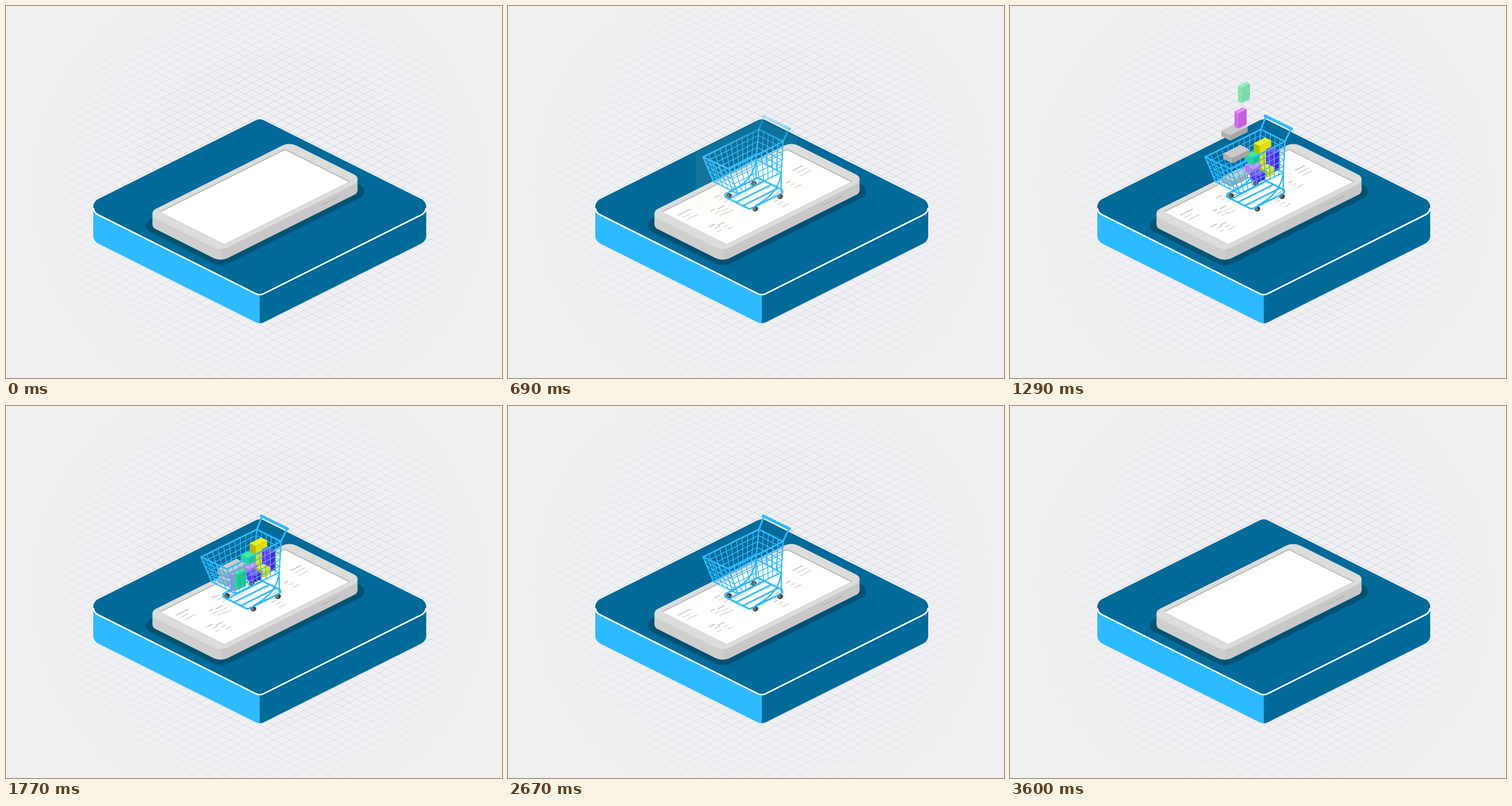
Animation of 864 by 648 pixels, one loop 3.63 s. Source, as an HTML page with a canvas:

```html
<!DOCTYPE html>
<html lang="en">
<head>
<meta charset="utf-8">
<title>Isometric shopping cart</title>
<style>
html, body { margin: 0; width: 100%; height: 100%; overflow: hidden; background: #f0f0f1; }
canvas { display: block; }
</style>
</head>
<body>
<canvas id="stage" width="864" height="648"></canvas>
<script>
const ctx = document.getElementById('stage').getContext('2d');
const LOOP = 3630, BLUE = '#2dbaff', NAVY = '#006a99';
const clamp = v => Math.max(0, Math.min(1, v));
const ramp = (t, from, to) => clamp((t - from) / (to - from));
const mix = (a, b, k) => [a[0] + (b[0] - a[0]) * k, a[1] + (b[1] - a[1]) * k];
const random = n => Math.abs(Math.sin(n * 12.9898) * 43758.5453) % 1;

function fill(color, points) {
  ctx.fillStyle = color;
  ctx.beginPath();
  points.forEach(p => ctx.lineTo(...p));
  ctx.fill();
}

function line(...points) {
  ctx.beginPath();
  points.forEach(p => ctx.lineTo(...p));
  ctx.stroke();
}

// Isometric rectangle (top, right, bottom, left) from its top corner and the
// horizontal extent of its right and left sides.
function iso(x, y, right, left) {
  return [[x, y], [x + right, y + right / 2],
    [x + right - left, y + (right + left) / 2], [x - left, y + left / 2]];
}

const moved = (points, dy) => points.map(([x, y]) => [x, y + dy]);

// radii: [top and bottom corners, side corners]
function rounded(points, radii) {
  const path = new Path2D();
  path.moveTo(...mix(points[3], points[0], 0.5));
  points.forEach((p, i) => path.arcTo(...p, ...mix(p, points[(i + 1) % 4], 0.5), radii[i % 2]));
  path.closePath();
  return path;
}

function split(x, left, right) {
  const g = ctx.createLinearGradient(x - 1, 0, x + 1, 0);
  g.addColorStop(0.5, left);
  g.addColorStop(0.5, right);
  return g;
}

function drawGrid() {
  const g = ctx.createRadialGradient(500, 310, 0, 438, 324, 440);
  g.addColorStop(0, 'rgba(120,105,235,.36)');
  g.addColorStop(0.5, 'rgba(130,140,240,.28)');
  g.addColorStop(1, 'rgba(140,180,250,0)');
  ctx.strokeStyle = g;
  ctx.lineWidth = 0.8;
  for (let y = -432; y < 1080; y += 13) {
    line([0, y], [864, y + 432]);
    line([0, y], [864, y - 432]);
  }
}

// Lower outline plus the band between the outer corners, covered by the top.
function slab(shape, radii, height, sides, top) {
  const inset = radii[1] * (Math.sqrt(5) - 1);
  const [, [x1, y1], , [x0, y0]] = shape;
  ctx.fillStyle = sides;
  ctx.fill(rounded(moved(shape, height), radii));
  fill(sides, [[x0 + inset, y0], [x1 - inset, y1], [x1 - inset, y1 + height], [x0 + inset, y0 + height]]);
  ctx.fillStyle = top;
  ctx.fill(rounded(shape, radii));
}

function drawPlatform() {
  const shape = iso(442, 195.5, 309, 309), radii = [15.4, 15.4];
  slab(shape, radii, 50, split(442, BLUE, NAVY), NAVY);
  ctx.save();
  ctx.beginPath();
  ctx.rect(0, 352, 864, 200);
  ctx.clip();
  ctx.strokeStyle = '#fff';
  ctx.lineWidth = 2.6;
  ctx.stroke(rounded(shape, radii));
  ctx.restore();
}

function drawPhone() {
  ctx.fillStyle = '#005273';
  ctx.fill(rounded(iso(493, 250, 146, 264.5), [32, 12]));
  slab(iso(493.5, 237, 130, 249.5), [28, 9], 18.5, split(375, '#cfcfcf', '#c8c8c8'), '#dcdcdc');
  fill('#bebebe', iso(486, 248.5, 114, 218));
  fill('#fff', iso(486, 251, 111, 216));
  ctx.strokeStyle = '#a4a4a4';
  ctx.lineWidth = 1;
  line([549, 347], [564, 340]);
  line([568, 338], [582, 331]);
}

// Paragraphs of three short strokes that write themselves and later wipe away.
function drawStrokes(t) {
  ctx.lineWidth = 0.9;
  for (let i = 0; i < 45; i++) {
    const group = Math.floor(i / 3), row = i % 3;
    const along = 0.03 + 0.86 * ((group * 0.618 + 0.02 * random(i + 50)) % 1);
    const across = 0.05 + 0.72 * random(group + 7) + 0.07 * row;
    const x = 270 + 216 * along + 111 * across, y = 359 - 108 * along + 55 * across;
    const width = group % 4 ? 6 + 7 * random(i + 90) : 12 + 12 * random(i + 90);
    const start = 60 + 260 * random(i + 20), stop = 3690 - x;
    const from = width * ramp(t, stop, stop + 160), to = width * ramp(t, start, start + 140);
    if (to <= from) continue;
    ctx.strokeStyle = row ? '#b2b2b2' : '#8c8c8c';
    line([x + from, y - from / 2], [x + to, y - to / 2]);
  }
}

function drawBeam(t) {
  const height = 100 * ramp(t, 90, 550), fade = ramp(t, 90, 250) * (1 - ramp(t, 500, 720));
  if (!fade) return;
  const base = iso(440, 298, 63, 113), roof = moved(base, -height);
  const tint = a => `rgba(255,255,186,${a * fade})`;
  fill(tint(0.38), roof);
  fill(tint(0.58), [base[3], base[2], roof[2], roof[3]]);
  fill(tint(0.46), [base[2], base[1], roof[1], roof[2]]);
}

const RIM = [[340, 263], [437, 215], [479, 236], [385, 284]];
const FLOOR = [[358, 306], [432, 267], [476, 290], [400, 327]];

function drawWall(i, j, columns) {
  ctx.lineWidth = 1.4;
  for (let k = 1; k < columns; k++)
    line(mix(RIM[i], RIM[j], k / columns), mix(FLOOR[i], FLOOR[j], k / columns));
  for (let k = 1; k < 5; k++)
    line(mix(RIM[i], FLOOR[i], k / 5), mix(RIM[j], FLOOR[j], k / 5));
  ctx.lineWidth = 2;
  line(RIM[i], FLOOR[i], FLOOR[j], RIM[j]);
  ctx.lineWidth = 3;
  line(RIM[i], RIM[j]);
}

function drawWheel(x, y) {
  [[x, y, 5, '#3f3f3f'], [x - 1.5, y + 0.7, 2.6, '#777']].forEach(([cx, cy, r, color]) => {
    ctx.fillStyle = color;
    ctx.beginPath();
    ctx.ellipse(cx, cy, r, r * 0.85, -0.5, 0, 7);
    ctx.fill();
  });
}

// Upright post and the curved brace that starts at its head.
function drawPost([x, y]) {
  line([x, y], [x, y + 33]);
  ctx.beginPath();
  ctx.moveTo(x, y);
  ctx.quadraticCurveTo(x - 4, y + 37, x - 44, y + 57);
  ctx.stroke();
}

function drawChassis(shown) {
  ctx.globalAlpha = clamp(shown * 3);
  iso(428, 309, 46, 43).forEach(p => drawWheel(...p));
  ctx.globalAlpha = clamp(shown * 2.1);
  ctx.strokeStyle = BLUE;
  ctx.lineWidth = 3;
  const base = iso(435, 299, 48, 62);
  ctx.stroke(rounded(base, [7, 4]));
  for (let k = 0.25; k < 1; k += 0.25) line(mix(base[3], base[2], k), mix(base[0], base[1], k));
  ctx.lineWidth = 2.5;
  drawPost(FLOOR[1]);
  drawPost(FLOOR[2]);
  ctx.globalAlpha = 1;
}

// The basket appears from below behind a soft edge.
function basketInk(shown) {
  const y = 340 - 250 * shown, g = ctx.createLinearGradient(0, y, 0, y + 90);
  g.addColorStop(0, 'rgba(45,186,255,0)');
  g.addColorStop(1, BLUE);
  return g;
}

function drawBasketBack() {
  drawWall(0, 1, 10);
  drawWall(1, 2, 5);
  line(RIM[1], [446, 192]);
  line(RIM[2], [490, 213]);
  ctx.lineWidth = 5;
  line([444.5, 191.5], [490.5, 214]);
}

// top, left and right face colours
const PURPLE = ['#8052f2', '#7728ff', '#5a1bd6'], YELLOW = ['#efef22', '#b9b90b', '#e0e008'],
  PINK = ['#e78bfb', '#d569ee', '#c85be0'], GREEN = ['#34f394', '#1fdf78', '#15c968'],
  GREY = ['#cacaca', '#b0b0b0', '#a6a6a2'];

// left width, right width, height
const CUBE = [12.5, 12.5, 11.5], BLOCK = [15, 15, 14], TOWER = [10.5, 20, 41],
  SLIM = [15, 9, 32], FLAT = [16, 30, 9], CARD = [6.5, 14.5, 27];

// In order of falling: left edge and top at rest
const BOXES = [
  [424.5, 229, TOWER, YELLOW], [446, 245, SLIM, PURPLE], [409, 269, BLOCK, PINK],
  [410, 253, CUBE, GREEN], [436, 275, CUBE, YELLOW], [419, 284, CUBE, PURPLE],
  [369, 283, FLAT, GREY], [371.5, 266, FLAT, GREY], [368, 269, FLAT, GREY],
  [391, 285, CARD, PINK], [397, 283, CARD, GREEN]
];

function drawBox(x, y, [a, b, height], [top, left, right]) {
  const roof = iso(x + b, y, a, b), base = moved(roof, height);
  fill(left, [roof[3], roof[2], base[2], base[3]]);
  fill(right, [roof[2], roof[1], base[1], base[2]]);
  fill(top, roof);
}

function drawBoxes(t) {
  const fade = 1 - ramp(t, 2160, 2640);
  BOXES.forEach(([x, y, size, colors], i) => {
    const [landing, reach] = i < 6 ? [1017 + 43 * i, 270] : [1269 + 51 * (i - 6), 172];
    const height = Math.max(0, 0.83 * (landing - t));
    ctx.globalAlpha = clamp((reach - height) / 40) * fade;
    if (ctx.globalAlpha) drawBox(x, y - height, size, colors);
  });
  ctx.globalAlpha = 1;
}

function drawCart(t) {
  const shown = ramp(t, 250, 900) * (1 - ramp(t, 2740, 3230));
  if (!shown) return;
  drawChassis(shown);
  ctx.strokeStyle = basketInk(shown);
  drawBasketBack();
  drawBoxes(t);
  drawWall(0, 3, 5);
  drawWall(3, 2, 10);
}

function frame() {
  const t = performance.now() % LOOP;
  ctx.fillStyle = '#f0f0f1';
  ctx.fillRect(0, 0, 864, 648);
  ctx.lineCap = 'butt';
  drawGrid();
  drawPlatform();
  drawPhone();
  drawStrokes(t);
  ctx.lineCap = ctx.lineJoin = 'round';
  drawCart(t);
  drawBeam(t);
  requestAnimationFrame(frame);
}
frame();
</script>
</body>
</html>
```
